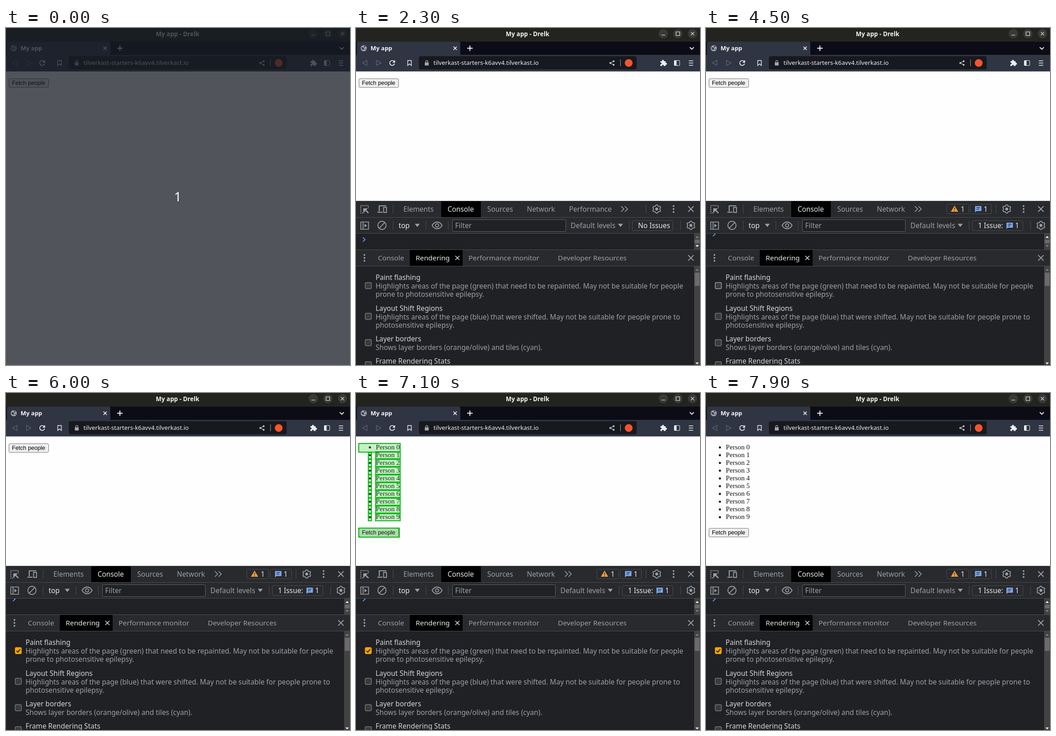
Write an HTML page that moves like this. It is 755 px wide and 741 px high and loops after 8 s.

```html
<!DOCTYPE html>
<html lang="en">
<head>
<meta charset="utf-8">
<title>My app</title>
<style>
  html, body { margin: 0; width: 100%; height: 100%; overflow: hidden; background: #fefefe; }
  svg { display: block; }
  text { font-family: "Noto Sans", "Open Sans", sans-serif; white-space: pre; }
  text.serif { font-family: "Liberation Serif", "Times New Roman", serif; }
  text.arial { font-family: "Liberation Sans", Arial, sans-serif; }
</style>
</head>
<body>
<svg id="stage" width="755" height="741" viewBox="0 0 755 741"></svg>
<script>
const LOOP = 8000, STEP = 100;
const GREY = '#9aa0a6', LIGHT = '#e8eaed', EDGE = '#494c50', BAR = '#292a2d', PANEL = '#202124', BLUE = '#7cacf8';
const stage = document.getElementById('stage');

function el(parent, tag, attrs = {}) {
  const node = document.createElementNS('http://www.w3.org/2000/svg', tag);
  for (const key in attrs) node.setAttribute(key, attrs[key]);
  return parent.appendChild(node);
}
const group = (p, attrs) => el(p, 'g', attrs);
const rect = (p, x, y, width, height, fill, more) => el(p, 'rect', { x, y, width, height, fill, ...more });
const disc = (p, cx, cy, r, fill, more) => el(p, 'circle', { cx, cy, r, fill, ...more });
const shape = (p, d, fill) => el(p, 'path', { d, fill });
const stroke = (p, d, color, width = 1.5, more) =>
  el(p, 'path', { d, fill: 'none', stroke: color, 'stroke-width': width, ...more });
function text(p, x, y, s, fill = GREY, size = 15.35, more = {}) {
  const node = el(p, 'text', { x, y, fill, 'font-size': size, ...more });
  node.textContent = s;
  return node;
}
const cross = (p, x, y, r, color, width) =>
  stroke(p, `M${x - r} ${y - r}l${2 * r} ${2 * r}m0 ${-2 * r}l${-2 * r} ${2 * r}`, color, width);
const divider = (p, x, y) => stroke(p, `M${x} ${y - 10}v20`, EDGE, 1);
const dots = (p, x, y) => [-6.5, 0, 6.5].forEach(d => disc(p, x, y + d, 1.9, GREY));
const dropArrow = (p, x, y) => shape(p, `M${x} ${y}h11l-5.5 7z`, GREY);
const outline = (p, x, y, w, h, color = EDGE, fill = 'none', rx = 2) =>
  rect(p, x + .5, y + .5, w - 1, h - 1, fill, { stroke: color, rx });

function gear(p, x, y) {
  const points = [];
  for (let i = 0; i < 24; i++) {
    const r = i % 4 < 2 ? 9.2 : 7.2, a = (i - 6.5) * Math.PI / 12;
    points.push(`${x + r * Math.cos(a)} ${y + r * Math.sin(a)}`);
  }
  stroke(p, `M${points.join('L')}z`, GREY, 1.8, { 'stroke-linejoin': 'round' });
  disc(p, x, y, 3.2, GREY);
}
function bubble(p, x, y) {
  shape(p, `M${x} ${y}h14v11h-11l-3 3z`, BLUE);
  stroke(p, `M${x + 3} ${y + 3.5}h8m-8 3.5h6`, BAR, 1.3);
}

/* ---------- web page ---------- */
rect(stage, 0, 95, 755, 646, '#fefefe');
const list = group(stage);
for (let i = 0; i < 10; i++) {
  disc(list, 30.5, 119.7 + 17.05 * i, 2.4, '#111');
  text(list, 43.5, 124 + 17.05 * i, 'Person ' + i, '#111', 15.15, { class: 'serif' });
}
const button = group(stage);
const buttonFace = outline(button, 6, 111, 88, 20, '#767676', '#efefef', 2.5);
text(button, 13, 125.3, 'Fetch people', '#000', 12.65, { class: 'arial' });

const flashBox = (p, x, y, x2, y2) => rect(p, x + 1, y + 1, x2 - x - 2, y2 - y - 2, 'rgba(0,185,0,.22)',
  { stroke: '#00b90a', 'stroke-width': 2 });
const buttonFlash = group(stage);
flashBox(buttonFlash, 5, 110, 95, 131);
const listFlash = group(stage);
flashBox(listFlash, 5, 110, 98, 131);
for (let i = 1; i < 10; i++) {
  const y = 111 + 17.05 * i;
  flashBox(listFlash, 26, i === 1 ? 130 : y, 35, y + 17.5);
  flashBox(listFlash, 42, y, 98, y + 17.5);
}
flashBox(listFlash, 5, 296, 96, 318);

/* ---------- browser window ---------- */
rect(stage, 0, 0, 755, 30, '#232320');
text(stage, 376.5, 18, 'My app - Drelk', '#f2f2f0', 13.3, { 'font-weight': 700, 'text-anchor': 'middle' });
[674.5, 706.5, 738.5].forEach(x => disc(stage, x, 12.5, 10.2, '#393937'));
stroke(stage, 'M670.5 15.5h8M702.5 8.5h8v8h-8z', '#eee', 1.1);
cross(stage, 738.5, 12.5, 3.6, '#eee', 1.2);

rect(stage, 0, 30, 755, 29, '#0b0c15');
shape(stage, 'M2 59V33q0-3 3-3h221q3 0 3 3v26z', '#2f3542');
rect(stage, 0, 59, 755, 36.5, '#2f3542');
disc(stage, 17, 44.5, 6.6, '#a6aab1');
shape(stage, 'M12 42l5 1 1 3-2 3-4-4zM17 39l4 1-1 3-3-1zM19 46l3-1-2 4z', '#3a404d');
text(stage, 32, 49, 'My app', '#f4f5f7', 13, { 'font-weight': 600 });
cross(stage, 217.5, 44.5, 3.6, '#f0f1f3', 1.5);
stroke(stage, 'M244 44.5h12m-6-6v12', '#fff', 1.8);
stroke(stage, 'M732.5 42.3l4.5 4.4 4.5-4.4', '#fff', 1.7);

stroke(stage, 'M24 71v11.5l-10-5.75zM45 71v11.5l10-5.75z', '#626975', 1.2);
stroke(stage, 'M83.7 73.5a5.4 5.4 0 1 0 1 4.8', '#eceef0', 1.7);
shape(stage, 'M85.8 70.5v5.8h-5.8z', '#eceef0');
stroke(stage, 'M113.5 71.5h8v11l-4-3.5-4 3.5z', '#eceef0', 1.4);
rect(stage, 138, 62, 478, 29, '#17191f', { rx: 4 });
rect(stage, 151, 75.5, 8.5, 7, '#a3a6ab', { rx: 1 });
stroke(stage, 'M153 76v-2.3a2.3 2.3 0 0 1 4.6 0V76', '#a3a6ab', 1.3);
text(stage, 170, 81.3, 'tilverkast-starters-k6avv4.tilverkast.io', '#f1f2f4', 13.2);
stroke(stage, 'M565.5 73l-7.5 4 7.5 4', '#c4c7cc', 1.2);
[[565.5, 73], [558, 77], [565.5, 81]].forEach(([x, y]) => disc(stage, x, y, 2, '#c4c7cc'));
stroke(stage, 'M580.5 69v15', '#a3a6ab', 1);
disc(stage, 598.5, 77, 8.5, '#fb542b');
shape(stage, 'M668 73h3.5a2.3 2.3 0 1 1 4.4 0h3.6v3.4a2.3 2.3 0 1 1 0 4.4v2.7h-4a2 2 0 1 0-3.8 0H668v-3.8a2 2 0 1 0 0-3.7z', '#eceef0');
outline(stage, 698, 71, 13, 12, '#eceef0', 'none', 1.5);
rect(stage, 698.5, 71.5, 5, 11, '#eceef0');
stroke(stage, 'M730.5 72.3h9.5M730.5 77.1h9.5M730.5 81.9h9.5', '#eceef0', 1.5);

/* ---------- developer tools ---------- */
const tools = group(stage);
rect(tools, 0, 380, 755, 361, BAR);
rect(tools, 0, 452, 755, 36, PANEL);
rect(tools, 0, 524, 755, 217, PANEL);
stroke(tools, 'M0 380.5h755M0 416.5h755M0 451.5h755M0 487.5h755M0 523.5h755', EDGE, 1);

const elementsHover = rect(tools, 90, 382, 97, 34, '#36373a');
stroke(tools, 'M10 390.5h18M27 392v5M10.5 393v15M13 406.5h5', GREY, 1.9, { 'stroke-dasharray': '2.4 1.9' });
shape(tools, 'M16 396.5h10l-3.6 3.6 5.8 5.8-1.9 1.9-5.8-5.8-4.5 4.5z', GREY);
stroke(tools, 'M51 403v-12h15.5M47 405h11', GREY, 2.2);
stroke(tools, 'M60.5 394.5h6.5v11h-6.5z', GREY, 1.8);
divider(tools, 81.5, 398);
rect(tools, 187, 381, 87, 35, '#000');
[['Elements', 104], ['Console', 201, LIGHT], ['Sources', 288], ['Network', 375]]
  .forEach(([s, x, color]) => text(tools, x, 403.5, s, color));
const performanceTab = text(tools, 467.5, 403.5, 'Performance');
const moreTabs = stroke(tools, 'M582 392l6 6-6 6m8-12l6 6-6 6', GREY, 1.7);
const badges = group(tools);
outline(badges, 528, 387, 49, 22);
shape(badges, 'M545.5 390.5l8 13.5h-16z', '#f29b38');
stroke(badges, 'M545.5 395v4.6m0 1.4v1.7', BAR, 1.5);
text(badges, 559, 403.5, '1', LIGHT);
outline(badges, 580, 387, 47, 22);
bubble(badges, 590.5, 391.5);
text(badges, 609.5, 403.5, '1', LIGHT);
divider(tools, 636.5, 398);
gear(tools, 660, 398);
dots(tools, 697, 398);
cross(tools, 735, 398, 6, GREY, 1.8);

stroke(tools, 'M10.5 426.5h17v16h-17zM15.5 426v17', GREY, 1.7);
shape(tools, 'M18.5 430.5l5.5 4-5.5 4z', GREY);
disc(tools, 57, 434, 9, 'none', { stroke: GREY, 'stroke-width': 1.8 });
stroke(tools, 'M50.7 440.3l12.6-12.6', GREY, 1.8);
divider(tools, 81.5, 434);
text(tools, 93.5, 439.5, 'top', LIGHT);
dropArrow(tools, 129, 430.5);
divider(tools, 153.5, 434);
const eye = group(tools, { stroke: GREY, fill: 'none', 'stroke-width': 1.8 });
el(eye, 'path', { d: 'M167 434q4.5-7.5 11-7.5t11 7.5q-4.5 7.5-11 7.5t-11-7.5z' });
el(eye, 'circle', { cx: 178, cy: 434, r: 3.6 });
divider(tools, 202.5, 434);
const filterBox = outline(tools, 211, 421, 250, 27, '#5f6368', PANEL, 1);
text(tools, 217.5, 440, 'Filter');
const levels = group(tools);
text(levels, 471, 439.5, 'Default levels', GREY, 15.6);
dropArrow(levels, 575, 430.5);
divider(levels, 600, 434);
const noIssues = group(tools);
outline(noIssues, 606, 423, 90, 23);
text(noIssues, 619, 439.5, 'No Issues', LIGHT);
const oneIssue = group(tools);
outline(oneIssue, 584, 423, 112, 23);
text(oneIssue, 597, 439.5, '1 Issue:', LIGHT);
bubble(oneIssue, 659.5, 428);
text(oneIssue, 678.5, 439.5, '1', LIGHT);
divider(tools, 712.5, 434);
gear(tools, 735, 434);

const clip = el(el(stage, 'defs'), 'clipPath', { id: 'consoleClip' });
rect(clip, 0, 452, 742, 35);
const promptArea = group(tools, { 'clip-path': 'url(#consoleClip)' });
const promptMark = stroke(promptArea, 'M15 460.5l5 4.7-5 4.7', '#5a9df6', 1.8);

rect(tools, 742, 452, 13, 35, '#424242');
rect(tools, 743.5, 465.5, 10.5, 8, '#6b6b6b');
const upArrow = shape(tools, 'M745 461.5h7.5l-3.75-4z');
const downArrow = shape(tools, 'M745 477.5h7.5l-3.75 4z');

const drawerHover = rect(tools, 35, 488, 83, 35, '#36373a');
dots(tools, 18.5, 505.5);
rect(tools, 118, 488, 116, 35, '#000');
[['Console', 48], ['Rendering', 131, LIGHT], ['Performance monitor', 247], ['Developer Resources', 443]]
  .forEach(([s, x, color]) => text(tools, x, 511, s, color, 15.3));
cross(tools, 222.5, 505.5, 4.6, LIGHT, 1.4);
cross(tools, 735, 505.5, 6, GREY, 1.8);

const options = [
  [555, 566.5, 'Paint flashing',
    'Highlights areas of the page (green) that need to be repainted. May not be suitable for people',
    'prone to photosensitive epilepsy.'],
  [622.5, 634, 'Layout Shift Regions',
    'Highlights areas of the page (blue) that were shifted. May not be suitable for people prone to',
    'photosensitive epilepsy.'],
  [690, 692, 'Layer borders', 'Shows layer borders (orange/olive) and tiles (cyan).'],
  [739, 740.5, 'Frame Rendering Stats']
];
const boxes = options.map(([y, boxY, title, ...lines]) => {
  text(tools, 43, y - .7, title, '#d3d6d9');
  lines.forEach((s, i) => text(tools, 43, y + 18 * (i + 1), s));
  return rect(tools, 20.2, boxY - 6.8, 13.6, 13.6, '#3b3b3b', { rx: 2.5, stroke: '#858585', 'stroke-width': 1.2 });
});
const tick = stroke(tools, 'M23 566.8l3 3 5.2-6.6', '#202124', 2.1);

rect(tools, 742, 524, 13, 217, '#424242');
rect(tools, 743.5, 538, 10.5, 29, '#6b6b6b');
shape(tools, 'M745 533.5h7.5l-3.75-4z', '#858585');
shape(tools, 'M745 735.5h7.5l-3.75 4z', '#fff');

/* ---------- countdown ---------- */
const countdown = group(stage);
rect(countdown, 0, 0, 755, 741, 'rgba(23,28,37,.75)');
text(countdown, 377, 381, '1', '#fff', 28, { 'text-anchor': 'middle' });

/* ---------- timeline ---------- */
const within = (t, ...spans) => spans.some(([from, to]) => t >= from && t < to);
const show = (node, on) => node.setAttribute('display', on ? 'inline' : 'none');
const fade = (t, start, end = LOOP) =>
  within(t, [start, end]) ? Math.max(0, 1 - (t - start) / 800) : 0;

function draw(t) {
  show(countdown, t < 100);
  show(tools, t >= 2300);
  drawTools(t);

  const loaded = t >= 7100;
  const hovered = within(t, [6300, 7200]), pressed = within(t, [6700, 6900]);
  show(list, loaded);
  button.setAttribute('transform', `translate(0 ${loaded ? 186 : 0})`);
  buttonFace.setAttribute('fill', pressed ? '#f5f5f5' : hovered ? '#e0e0e0' : '#efefef');
  buttonFlash.setAttribute('opacity', fade(t, 6300, 6700) + fade(t, 6700, 7100));
  listFlash.setAttribute('opacity', fade(t, 7100));
}

function drawTools(t) {
  const issue = t >= 2400, scrolled = t >= 2500, narrow = t >= 2700;
  show(noIssues, !issue);
  show(oneIssue, issue);
  filterBox.setAttribute('width', issue ? 226 : 249);
  levels.setAttribute('transform', `translate(${issue ? -22.5 : 0} 0)`);
  promptMark.setAttribute('transform', `translate(0 ${scrolled ? -12 : 0})`);
  upArrow.setAttribute('fill', scrolled ? '#fff' : '#858585');
  downArrow.setAttribute('fill', scrolled ? '#858585' : '#fff');
  show(performanceTab, !narrow);
  show(badges, narrow);
  moreTabs.setAttribute('transform', `translate(${narrow ? -123.5 : 0} 0)`);

  eye.setAttribute('stroke', within(t, [3500, 3600]) ? LIGHT : GREY);
  show(drawerHover, within(t, [3700, 3800], [5800, 5900]));
  show(elementsHover, within(t, [5900, 6000]));

  const checked = t >= 5400;
  const over = within(t, [3800, 4200], [4500, 5200], [5400, 5800]);
  boxes[0].setAttribute('fill', checked ? (over ? '#ffb42e' : '#fca503') : '#3b3b3b');
  boxes[0].setAttribute('stroke', checked ? (over ? '#ffb42e' : '#fca503') : over ? '#b4b4b4' : '#858585');
  show(tick, checked);
}

const begin = performance.now();
function tickFrame() {
  const t = (performance.now() - begin) % LOOP;
  draw(Math.floor(t / STEP) * STEP);
  requestAnimationFrame(tickFrame);
}
tickFrame();
</script>
</body>
</html>
```
